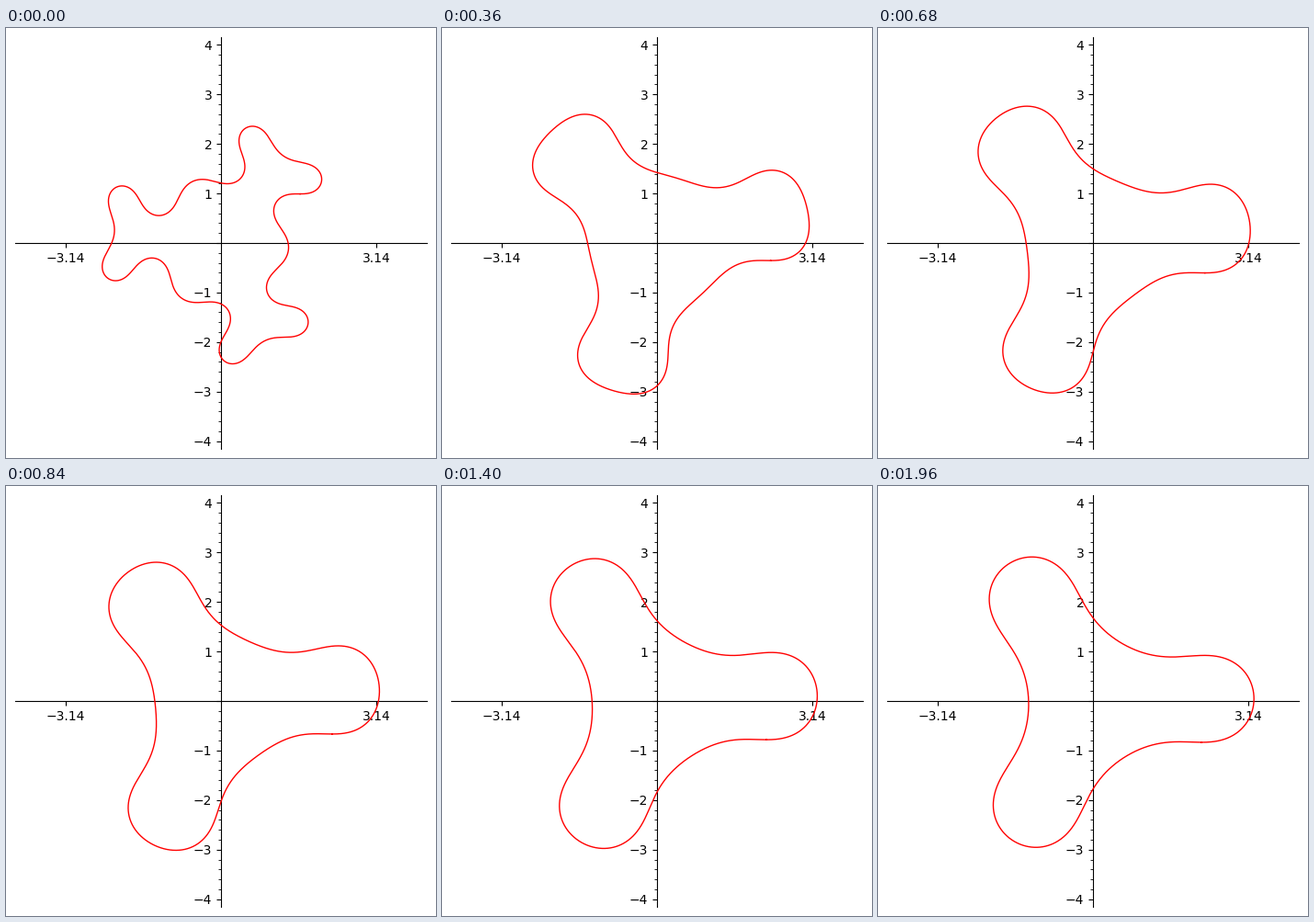
A matplotlib script for the animation above (2 s loop, 468x468 px).

```python
import numpy as np
import matplotlib.pyplot as plt
from matplotlib.animation import FuncAnimation
from matplotlib.ticker import AutoMinorLocator

SIZE, DPI = 468, 100
FRAMES, INTERVAL = 50, 40
SAMPLES = 3000
MARGIN = 9.75 / SIZE
LIMIT = 4.16

plt.rcParams["font.family"] = "DejaVu Sans"
plt.rcParams["font.size"] = 10


def closed_curve(amp):
    """Curve of length 6*pi whose tangent angle carries 3- and 9-fold waves."""
    ds = 2 * np.pi / SAMPLES
    s = (np.arange(SAMPLES) + 0.5) * ds
    angle = s + (1 - np.cos(3 * s)) + amp * (1 - np.cos(9 * s))
    z = np.concatenate([[0], np.cumsum(3 * ds * np.exp(1j * angle))])
    z -= z[:-1].mean()
    return z.real, z.imag


fig = plt.figure(figsize=(SIZE / DPI, SIZE / DPI), dpi=DPI, facecolor="white")
ax = fig.add_axes([MARGIN, MARGIN, 1 - 2 * MARGIN, 1 - 2 * MARGIN])
ax.set_xlim(-LIMIT, LIMIT)
ax.set_ylim(-LIMIT, LIMIT)

for side in ("top", "right"):
    ax.spines[side].set_visible(False)
for side in ("left", "bottom"):
    ax.spines[side].set_position("zero")

ax.set_xticks([-np.pi, np.pi], ["\u22123.14", "3.14"])
values = [v for v in range(-4, 5) if v]
ax.set_yticks(range(-4, 5),
              [str(v).replace("-", "\u2212") if v else "" for v in range(-4, 5)])
ax.yaxis.set_minor_locator(AutoMinorLocator(5))

line, = ax.plot([], [], color="red", lw=1, zorder=5)


def draw(i):
    # the fine wave fades as 1/t while t runs from 1 to 15
    t = 1 + 14 * i / (FRAMES - 1)
    line.set_data(*closed_curve(1 / t))
    return line,


anim = FuncAnimation(fig, draw, frames=FRAMES, interval=INTERVAL,
                     repeat=True, repeat_delay=0, blit=False)
plt.show()
```
